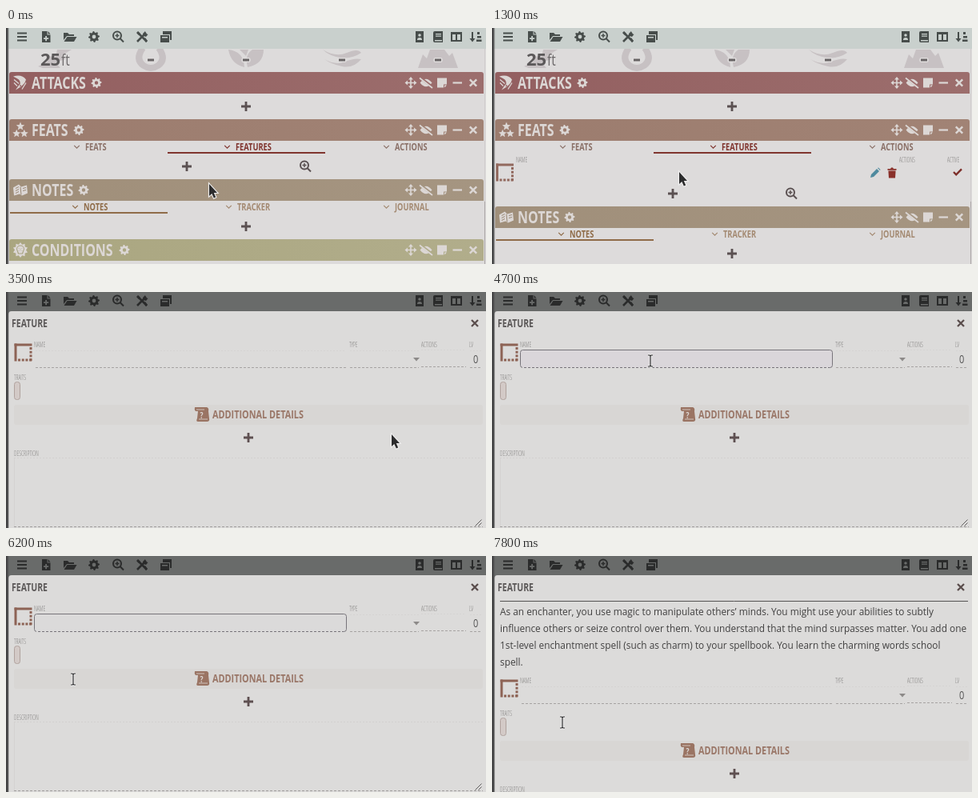
Recreate the animation shown at these times as an HTML page with a canvas. Size 600 by 295 pixels, loop 8000 ms.

```html
<!DOCTYPE html>
<html lang="en">
<head>
<meta charset="utf-8">
<title>Feature sheet</title>
<style>
html, body { margin: 0; width: 100%; height: 100%; overflow: hidden; background: #dddbdb; }
canvas { display: block; width: 600px; height: 295px; }
</style>
</head>
<body>
<canvas id="stage"></canvas>
<script>
const W = 600, H = 295, LOOP = 8000;
const cv = document.getElementById('stage');
const ctx = cv.getContext('2d');
const dpr = window.devicePixelRatio || 1;
cv.width = W * dpr;
cv.height = H * dpr;

/* ---------- text ---------- */
const STRETCH = { condensed: 0.76, 'semi-condensed': 0.885, normal: 1 };

function ratio(stretch, family) {
  const sample = 'Additional FEATURES';
  ctx.font = `normal 40px "${family}"`;
  const full = ctx.measureText(sample).width;
  ctx.font = `${stretch} 40px "${family}"`;
  return ctx.measureText(sample).width / full;
}
const family = ['Open Sans', 'Noto Sans'].find(f => ratio('condensed', f) < 0.9) || 'Open Sans';
// Uniform narrowing for faces the system has no width variant of
const squeeze = {};
for (const s in STRETCH) {
  const k = STRETCH[s] / ratio(s, family);
  squeeze[s] = Math.abs(k - 1) > 0.06 ? k : 1;
}

function text(str, x, y, size, color, weight = 700, stretch = 'condensed') {
  ctx.save();
  ctx.translate(x, y);
  ctx.scale(squeeze[stretch], 1);
  ctx.font = `${stretch} ${weight} ${size}px "${family}", "Open Sans", sans-serif`;
  ctx.fillStyle = color;
  ctx.fillText(str, 0, 0);
  ctx.restore();
}
const label = (str, x, y) => text(str, x, y, 9.4, '#858382', 300);

/* ---------- shapes ---------- */
function rect(x, y, w, h, color) {
  ctx.fillStyle = color;
  ctx.fillRect(x, y, w, h);
}
function box(x, y, w, h, r, fill, stroke) {
  ctx.beginPath();
  ctx.roundRect(x, y, w, h, r);
  if (fill) { ctx.fillStyle = fill; ctx.fill(); }
  if (stroke) { ctx.strokeStyle = stroke; ctx.lineWidth = 1; ctx.stroke(); }
}
function line(x1, y1, x2, y2, color, width = 1, dash = []) {
  ctx.save();
  ctx.beginPath();
  ctx.setLineDash(dash);
  ctx.moveTo(x1, y1);
  ctx.lineTo(x2, y2);
  ctx.strokeStyle = color;
  ctx.lineWidth = width;
  ctx.stroke();
  ctx.restore();
}
function fill(d, x, y, color) {
  ctx.save();
  ctx.translate(x, y);
  ctx.fillStyle = color;
  ctx.fill(new Path2D(d), 'evenodd');
  ctx.restore();
}
function stroke(d, x, y, color, width) {
  ctx.save();
  ctx.translate(x, y);
  ctx.strokeStyle = color;
  ctx.lineWidth = width;
  ctx.stroke(new Path2D(d));
  ctx.restore();
}
function radial(x, y, n, radius, color, hole = 0) {
  ctx.beginPath();
  for (let i = 0; i < n; i++) {
    const a = i / n * 2 * Math.PI - Math.PI / 2, r = radius(i);
    ctx.lineTo(x + r * Math.cos(a), y + r * Math.sin(a));
  }
  ctx.closePath();
  if (hole) { ctx.moveTo(x + hole, y); ctx.arc(x, y, hole, 0, 7); }
  ctx.fillStyle = color;
  ctx.fill('evenodd');
}
const gear = (x, y, color, r = 6.5) =>
  radial(x, y, 32, i => (i + 1) % 4 < 2 ? r : r * 0.76, color, r * 0.34);
const star = (x, y, r, color) => radial(x, y, 10, i => i % 2 ? r * 0.45 : r, color);
const cross = (x, y, s, color, w) => stroke(`M${-s} ${-s}L${s} ${s}M${s} ${-s}L${-s} ${s}`, x, y, color, w);
const plus = (x, y, color = '#5b5152') => stroke('M-6 0H6M0-6V6', x, y, color, 2.8);
const chevron = (x, y, color) => stroke('M-3.3-1.7L0 1.7L3.3-1.7', x, y, color, 1.2);
function zoom(x, y, color) {
  stroke('M4-1.5A5 5 0 1 1-6-1.5A5 5 0 1 1 4-1.5ZM2.5 2L7 6.5', x, y, color, 2);
  stroke('M-3.5-1.5H1.5M-1-4V1', x, y, color, 1.5);
}
function frameIcon(x, y, color) {
  rect(x, y, 22, 3, color);
  rect(x, y, 3, 22, color);
  for (let i = 0; i < 4; i++) {
    rect(x + 19, y + 4.5 + i * 4.7, 3, 3, color);
    rect(x + 4.5 + i * 4.7, y + 19, 3, 3, color);
  }
}
const pencil = (x, y, color) =>
  fill('M-6 6L-5 2L2-5L5-2L-2 5ZM3-6L4-6.5L6.5-4L6-3Z', x, y, color);

/* ---------- toolbar ---------- */
function toolbar(bg, ink) {
  rect(0, 0, W, 26, bg);
  stroke('M-6-4.5H6M-6 0H6M-6 4.5H6', 20, 11, ink, 2);
  fill('M-5-7H1.5V-2.5H5.5V7H-5ZM2.5-7L5.5-3.5H2.5ZM-3 1.2V3H-.8V5.2H1V3H3.2V1.2H1V-1H-.8V1.2Z', 50, 11, ink);
  fill('M-8 4V-5H-3L-1-3H5V-1H-4ZM-3.5 0H8.5L5 6H-7.5Z', 80, 11, ink);
  gear(110, 11, ink, 7);
  zoom(140, 11, ink);
  stroke('M-6 6L5-5M-5.5-5.5L6 6', 170, 11, ink, 2.6);
  fill('M1-4L4-7L5-4L7.5-3L5 0L2-1ZM-7-5L-5-7L-2-4L-4-2ZM2 3L4 1L7 5L5 7Z', 170, 11, ink);
  fill('M-4-7H7V4H5V-3H-4ZM-7-2H4V7H-7ZM-5 0V1.5H2V0Z', 200, 11, ink);
  fill('M-5-7H5V7H-5ZM-1.8-2A1.8 1.8 0 1 0 1.8-2A1.8 1.8 0 1 0-1.8-2ZM-3 4H3Q3 1 0 1Q-3 1-3 4Z', 517, 11, ink);
  fill('M-6-5Q-6-7-4-7H6V7H-4Q-6 7-6 5ZM-3-4V-2.8H4V-4ZM-3-1.5V-.3H4V-1.5ZM-4 4V5.5H5V4Z', 540, 11, ink);
  fill('M-7-6H7V6H-7ZM-5-3V4H-1V-3ZM1-3V4H5V-3Z', 563, 11, ink);
  fill('M-5-6H-3V2H-.5L-4 6.5L-7.5 2H-5ZM2-6H5V-3H2ZM2-1H7V1.5H2ZM1 3.5H7.5V6H1Z', 587, 11, ink);
}

/* ---------- character sheet ---------- */
const PALE = '#dcd7d5';

function bar(y, c1, c2, title, gearX, icon) {
  const g = ctx.createLinearGradient(4, 0, 597, 0);
  g.addColorStop(0, c1);
  g.addColorStop(1, c2);
  box(4, y, 593, 27, [3, 3, 0, 0], g);
  const m = y + 13.5;
  icon(18, m);
  text(title, 32, y + 21, 21, PALE);
  gear(gearX, m, PALE);
  stroke('M-5 0H5M0-5V5', 506, m, PALE, 1.6);
  fill('M0-7.5L3-4H-3ZM0 7.5L3 4H-3ZM-7.5 0L-4-3V3ZM7.5 0L4-3V3Z', 506, m, PALE);
  fill('M-7.5 0Q0-9.5 7.5 0Q0 9.5-7.5 0Z', 525, m, PALE);
  line(517, m - 7, 534, m + 6, c2, 3.4);
  line(517, m - 6, 533, m + 6.5, PALE, 1.6);
  fill('M-6-6H6V2H2V6H-6ZM3 3H6L3 6Z', 545, m, PALE);
  line(558.5, m, 570, m, PALE, 2.2);
  cross(584, m, 4.2, PALE, 2.4);
}
const icons = {
  blade(x, y) {
    fill('M-9-8Q2-11 7-4Q5 3-1 5Q1-1-2-4Q-5-6-9-8ZM-4 6L-1 2L2 4L-6 9Z', x, y, PALE);
    stroke('M-8-4L-2 1M-8 0L-4 4M7 0L2 8', x, y, PALE, 1.3);
  },
  stars(x, y) {
    star(x, y - 4.5, 5.5, PALE);
    star(x - 4.8, y + 4.5, 5.2, PALE);
    star(x + 4.8, y + 4.5, 5.2, PALE);
  },
  book(x, y) {
    fill('M-9-3L-2-7L1-4L8-6L9 4L2 7L-1 5L-8 7Z', x, y, PALE);
    stroke('M0-4L1 6M-6-2L-2-4M-6 1L-2-1M-6 4L-2 2M3-2L7-3M3 1L7 0', x, y, '#9a8975', 1);
  },
  skull(x, y) {
    radial(x, y, 20, i => i % 2 ? 7 : 9.5, PALE);
    fill('M-5-1A5 5 0 1 1 5-1L3 5H-3ZM-3-2V1H-1V-2ZM1-2V1H3V-2Z', x, y, '#a7a381');
    fill('M-4-1A4 4 0 1 1 4-1L2 4H-2ZM-2.8-2V1H-.8V-2ZM.8-2V1H2.8V-2Z', x, y, PALE);
  }
};
function tabs(y, names, active, idle, hot, underline) {
  names.forEach(([name, x], i) => {
    const color = i === active ? hot : idle;
    chevron(x - 10.5, y + 7.5, color);
    text(name, x, y + 12, 12.2, color);
  });
  rect(underline, y + 14, 197, 2, hot);
}
function vitals() {
  const c = '#c7c1c3';
  fill('M-20 21L-8 15L-10 8L2 9L4 0H22L10 7L14 12L2 16L8 23H-14Z', 60, 27, c);
  stroke('M-10-6Q-20 8-9 16Q0 22 9 16Q20 8 10-6', 181, 31, c, 8);
  fill('M-22 0Q-3 2-2 22Q-19 18-22 0ZM2 22Q-2 6 8 0H22Q22 18 2 22ZM-8 0H3L0 8Z', 300, 27, c);
  fill('M-24 0Q-8 10 6 4T24 4Q12 12-2 10T-24 0ZM-22 12Q-8 20 4 15T24 12Q14 24 0 21T-22 12Z', 420, 27, c);
  fill('M-25 23L-19 6L-14 11L-10 0H8L14 8L18 4L25 23Z', 540, 27, c);
  text('25', 43, 47, 22, '#5c595a', 700, 'normal');
  text('ft', 69, 47, 20.5, '#6b6869', 400);
  for (const x of [181, 300, 420, 540]) {
    box(x - 5.5, 37, 11, 6, 2, '#e0dddd');
    rect(x - 4, 38.5, 8, 3, '#686465');
  }
}
function featureRow(hover) {
  label('NAME', 30, 168);
  label('ACTIONS', 509, 168);
  label('ACTIVE', 569, 168);
  frameIcon(5, 169.5, '#92695e');
  if (hover) box(468, 170, 22, 23, 3, '#4b8890');
  pencil(479, 181, hover ? '#d7dcdc' : '#4f8a9e');
  fill('M-5.5-5H-2L-1-6.5H1L2-5H5.5V-3.3H-5.5ZM-4.6-2.5H4.6L4 6.5H-4Z', 500, 181, '#8a312b');
  stroke('M-5 0L-1.8 3.4L5-3.6', 582, 180, '#7c2d28', 2.3);
}
function sheet(t) {
  rect(0, 0, W, H, '#dddbdb');
  vitals();
  toolbar('#c9d0cd', '#474d4b');
  line(598.5, 26, 598.5, 217, '#cfcccc');
  line(598.5, 217, 598.5, H, '#aaa6a6');

  bar(55, '#935f60', '#9c6e6d', 'ATTACKS', 113, icons.blade);
  plus(300, 98);
  bar(114, '#9c7c6e', '#a18375', 'FEATS', 91, icons.stars);
  tabs(141, [['FEATS', 99], ['FEATURES', 287], ['ACTIONS', 486]], 1, '#8b7168', '#80352f', 202);

  const shift = t < 600 ? 0 : t < 1300 ? 28 : 34;
  if (t >= 600) featureRow(t >= 2500);
  ctx.save();
  ctx.translate(0, shift);
  if (t >= 300 && t < 600) box(154, 162, 145, 22, 3, '#d5d1d0');
  plus(226, 173);
  zoom(374, 173, '#5b5152');
  bar(189, '#a08f7a', '#a59581', 'NOTES', 97, icons.book);
  tabs(216, [['NOTES', 97], ['TRACKER', 289], ['JOURNAL', 486]], 0, '#a48a72', '#8f6c49', 5);
  plus(300, 248);
  bar(264, '#aaa680', '#b1ad8b', 'CONDITIONS', 148, icons.skull);
  ctx.restore();
}

/* ---------- feature dialog ---------- */
const PROSE = [
  'As an enchanter, you use magic to manipulate others’ minds. You might use your abilities to subtly',
  'influence others or seize control over them. You understand that the mind surpasses matter. You add one',
  '1st-level enchantment spell (such as charm) to your spellbook. You learn the charming words school',
  'spell.'
];
const prose = (x, y) =>
  PROSE.forEach((s, i) => text(s, x, y + i * 21, 13.4, '#414040', 400, 'semi-condensed'));

function field(x1, x2, y) {
  line(x1, y, x2, y, '#a6a3a2', 1, [3, 2]);
  line(x1, y - 21, x2, y - 21, '#d5d3d2', 1, [2, 2]);
}
function dialog(t) {
  const saved = t >= 7000, focus = t >= 4200 && t < 6500;
  const hover = t >= 4000 && t < 4900, writing = t >= 6500 && !saved;
  rect(0, 0, W, H, '#696b6a');
  toolbar('#696b6a', '#2a2b2b');
  box(3, 24, 600, 280, [4, 0, 0, 0], '#dcdbda');
  text('FEATURE', 7, 44, 13.8, '#5c5959');
  cross(586, 39, 4, '#5a4d4c', 2.3);
  if (saved) {
    line(10, 56.5, 595, 56.5, '#555353');
    prose(10, 74);
  }
  ctx.save();
  ctx.translate(0, saved ? 90 : 0);
  frameIcon(10.5, 64.5, '#8d6355');
  label('NAME', 35, 69);
  label('TYPE', 429, 69);
  label('ACTIONS', 519, 69);
  label('LV', 579, 69);
  if (hover || focus) box(35.5, 72.5, 390, 22, 3, hover ? '#dad6da' : '#dbdada');
  if (focus) {
    box(35.5, 72.5, 390, 22, 3, null, '#77747a');
    line(38, 94.5, 423, 94.5, '#dbdada', 1, [2, 3]);
    if (t < 4700 || (t >= 5200 && t < 5700)) rect(38.5, 75, 1, 17, '#444');
  } else {
    field(37, 425, 94.5);
  }
  field(430, 516, 94.5);
  field(519, 575, 93.5);
  field(580, 594, 94.5);
  fill('M-4-2H4L0 2.5Z', 513, 84, '#8d8a89');
  text('0', 584, 89, 14.5, '#555', 400);

  label('TRAITS', 10, 110);
  box(10.5, 112.5, 7, 22, 3, '#d3cac7', '#b0a29d');

  box(10, 141, 586, 25, 3, '#d8d6d4');
  fill('M-9-9H6Q9-8 8-4L9 5Q10 9 6 9H-5Q-8 9-6 5L-5-4H-8Q-10-6-9-9Z', 245, 153, '#9a7463');
  text('?', 242.5, 158, 11, '#dcd7d4');
  stroke('M-7-6H3M-4 6H7', 245, 153, '#d0c2ba', 1);
  text('ADDITIONAL DETAILS', 258, 158, 14.3, '#9a7768');

  if (t >= 5300 && t < 5500) box(158, 172, 290, 20, 3, '#d5d2d1');
  plus(303, 182, '#5e5051');

  label('DESCRIPTION', 10, 205);
  if (writing) {
    box(10.5, 207.5, 585, 86, 3, '#dad6da', '#77747a');
    if (t >= 6700) prose(13, 224);
    else rect(13.5, 212, 1, 16, '#444');
  } else {
    line(10, 207.5, 596, 207.5, '#d2d0cf', 1, [2, 2]);
    line(10, 293.5, 596, 293.5, '#a09d9c', 1, [3, 2]);
    line(10.5, 208, 10.5, 293, '#d4d2d1');
  }
  stroke('M-4 4L4-4M0 4L4 0', 590.5, 288.5, '#5f5d5d', 1);
  ctx.restore();
}

/* ---------- pointer ---------- */
const PATH = [
  [0, 254, 195, 'arrow'], [200, 238, 180, 'arrow'], [300, 228, 172, 'hand'], [400, 225, 170, 'hand'],
  [800, 225, 170, 'hand'], [900, 234, 180, 'arrow'], [1600, 234, 180, 'arrow'],
  [1800, 190, 186, 'arrow'], [1900, 180, 187, 'arrow'], [2000, 196, 187, 'arrow'],
  [2200, 340, 185, 'arrow'], [2400, 462, 181, 'arrow'], [2500, 482, 179, 'hand'],
  [2600, 482, 179, 'hand'], [2800, 483, 178, 'hand'], [3400, 483, 178, 'hand'],
  [3500, 482, 178, 'arrow'], [3700, 430, 160, 'arrow'], [4000, 265, 92, 'beam'], [4300, 198, 86, 'beam'],
  [4700, 198, 86, 'beam'], [4900, 195, 130, 'arrow'], [5100, 184, 165, 'arrow'],
  [5200, 184, 165, 'arrow'], [5300, 178, 175, 'hand'], [5400, 178, 175, 'hand'], [5500, 177, 162, 'beam'],
  [5600, 177, 162, 'beam'], [5900, 84, 154, 'beam'], [6200, 84, 154, 'beam'], [6500, 78, 262, 'beam'],
  [7300, 78, 262, 'beam'], [7500, 82, 249, 'beam'], [7600, 82, 249, 'beam'], [7800, 88, 208, 'beam'],
  [8000, 88, 208, 'beam']
];
const SHAPES = {
  arrow: 'M0 0V15L3.3 12L5.8 17.5L8.2 16.4L5.8 11H10Z',
  hand: 'M-2 .5a2 2 0 0 1 4 0V5.5L7 6.5Q10 7 10 9.5L8.5 16.5H-.5L-5 10.5Q-6 8-3.7 8L-2 9.5Z'
};
function pointer(t) {
  const i = PATH.findIndex((k, n) => t >= k[0] && t < PATH[n + 1][0]);
  const [t0, x0, y0, kind] = PATH[i], [t1, x1, y1] = PATH[i + 1];
  const p = (t - t0) / (t1 - t0);
  const x = x0 + (x1 - x0) * p, y = y0 + (y1 - y0) * p;
  if (kind === 'beam') {
    const d = 'M-3-7H-1L0-6L1-7H3M0-6V6M-3 7H-1L0 6L1 7H3';
    stroke(d, x, y, '#f0efef', 2.8);
    stroke(d, x, y, '#2c2c2d', 1.2);
  } else {
    const dark = kind === 'arrow';
    stroke(SHAPES[kind], x, y, dark ? '#efeeee' : '#2c2c2d', 2.2);
    fill(SHAPES[kind], x, y, dark ? '#2c2c2d' : '#f0efef');
    if (!dark) stroke('M2 5.5V9M4.8 6.5V9.5M7.4 7V10', x, y, '#2c2c2d', 0.8);
  }
}

function draw(now) {
  // The screen refreshes ten times a second
  const t = Math.floor(now % LOOP / 100) * 100;
  ctx.setTransform(dpr, 0, 0, dpr, 0, 0);
  if (t < 3500) sheet(t);
  else dialog(t);
  const edge = ctx.createLinearGradient(0, 0, 4, 0);
  edge.addColorStop(0, '#3c3c3d');
  edge.addColorStop(0.5, '#4c4c4d');
  edge.addColorStop(1, 'rgba(90,90,90,0)');
  rect(0, 0, 4, H, edge);
  pointer(t);
}

const start = performance.now();
function loop() {
  draw(performance.now() - start);
  requestAnimationFrame(loop);
}
loop();
</script>
</body>
</html>
```
